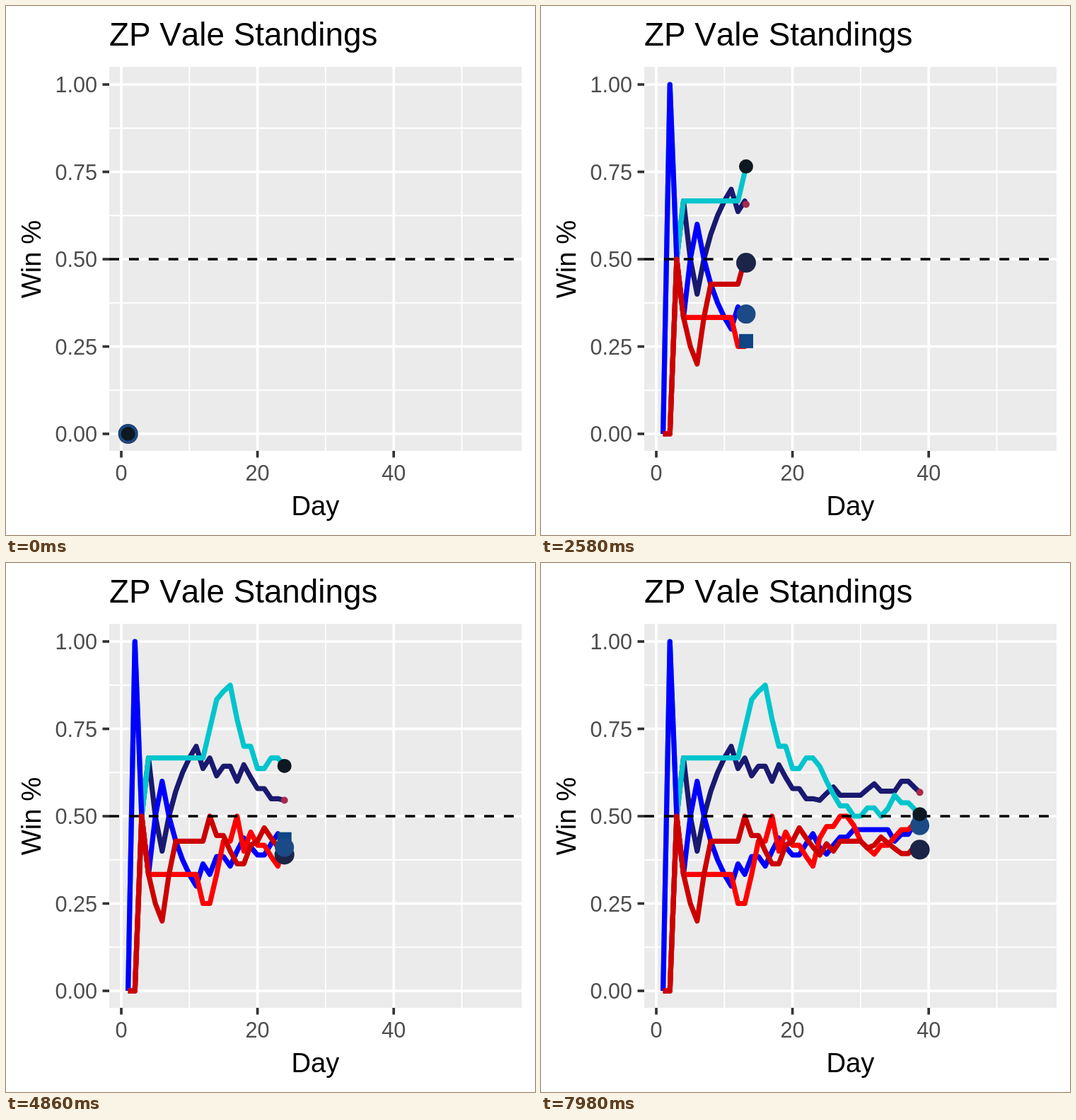
Recreate the animation shown at these times as an HTML page. Size 748 by 748 pixels, loop 8 s.

```html
<!DOCTYPE html>
<html lang="en">
<head>
<meta charset="utf-8">
<title>Standings</title>
<style>
  html, body { margin: 0; width: 100%; height: 100%; overflow: hidden; background: #fff; }
  svg { display: block; width: 100%; height: 100%; }
  text { font-family: "Liberation Sans", Arial, sans-serif; font-kerning: none; }
  .label { font-size: 30.6px; fill: #4d4d4d; }
  .axis { font-size: 38.2px; text-anchor: middle; }
  .title { font-size: 45.8px; }
</style>
</head>
<body>
<svg id="chart" viewBox="0 0 748 748">
  <rect x="146" y="86" width="583" height="543" fill="#ebebeb"/>
  <g id="grid"></g>
  <g id="lines" fill="none" stroke-width="7.2" stroke-linejoin="round"></g>
  <path d="M146 358H729" stroke="#000" stroke-width="3.6" stroke-dasharray="13.95"/>
  <g id="marks"></g>
  <text class="title" x="146" y="56">ZP Vale Standings</text>
  <text class="axis" x="437.5" y="720">Day</text>
  <text class="axis" transform="translate(49 358) rotate(-90)">Win %</text>
</svg>
<script>
const LOOP = 8000, STEP = 60, DAYS_PER_STEP = 0.2834;
const PANEL = { left: 146, right: 729, top: 86, bottom: 629 };
const xAt = day => 163 + day * 9.63;
const yAt = share => 605 - share * 494;

// Wins and losses added by one day's result, from day 2 on.
const RESULTS = { W: [1, 0], L: [0, 1], D: [1, 1], S: [2, 0], X: [0, 2], '-': [0, 0] };

// In drawing order of the lines; layer orders the markers.
const teams = [
  { color: '#191970', shape: 'circle', size: 10, fill: '#a82a4c', layer: 0,
    season: 'LWWLLWWWWWLWLW-LSLL-L-DWWL---WWL--S-LL' },
  { color: '#00c5cd', shape: 'circle', size: 20, fill: '#0d1820', layer: 4,
    season: 'WLW--------WSWWLL-L-W-DLLL-LDW-LWSL-LL' },
  { color: '#0000ff', shape: 'circle', size: 27, fill: '#1b4a86', layer: 3,
    season: 'WLLWWLLLLLWLW-LWWLL-WWXLWW-W-----XW-SL' },
  { color: '#ff0000', shape: 'square', size: 20, fill: '#0f4585', layer: 2,
    season: 'LWL-------L-DW-WXWL-LLSW-W-LXLLW-WW-WW' },
  { color: '#cd0000', shape: 'circle', size: 28, fill: '#1c2448', layer: 1,
    season: 'LWLLLWW----WL-LL-WDWLLLWLW---LDWLLL-WL' }
];

function add(parent, name, attrs, text) {
  const node = document.createElementNS('http://www.w3.org/2000/svg', name);
  for (const key in attrs) node.setAttribute(key, attrs[key]);
  if (text) node.textContent = text;
  return parent.appendChild(node);
}

function winShares(season) {
  let wins = 0, games = 0;
  return [0, ...[...season].map(result => {
    const [won, lost] = RESULTS[result];
    wins += won;
    games += won + lost;
    return games ? wins / games : 0;
  })];
}

const grid = document.getElementById('grid');
const stroke = (d, color, width) => add(grid, 'path', { d, stroke: color, 'stroke-width': width });
const vertical = (day, width) => stroke(`M${xAt(day)} ${PANEL.top}V${PANEL.bottom}`, '#fff', width);
const horizontal = (share, width) => stroke(`M${PANEL.left} ${yAt(share)}H${PANEL.right}`, '#fff', width);

[10, 30, 50].forEach(day => vertical(day, 1.85));
[0.125, 0.375, 0.625, 0.875].forEach(share => horizontal(share, 1.85));
[0, 20, 40].forEach(day => {
  vertical(day, 3.7);
  stroke(`M${xAt(day)} ${PANEL.bottom}v9.5`, '#333', 3.7);
  add(grid, 'text', { class: 'label', x: xAt(day), y: 671, 'text-anchor': 'middle' }, String(day));
});
[0, 0.25, 0.5, 0.75, 1].forEach(share => {
  horizontal(share, 3.7);
  stroke(`M${PANEL.left} ${yAt(share)}h-9.5`, '#333', 3.7);
  add(grid, 'text', { class: 'label', x: 129, y: yAt(share) + 11, 'text-anchor': 'end' }, share.toFixed(2));
});

const lines = document.getElementById('lines');
const marks = document.getElementById('marks');
for (const team of teams) {
  team.shares = winShares(team.season);
  team.line = add(lines, 'polyline', { stroke: team.color });
}
for (const team of [...teams].sort((a, b) => a.layer - b.layer)) {
  const { size, fill } = team;
  team.mark = team.shape === 'circle'
    ? add(marks, 'circle', { r: size / 2, fill })
    : add(marks, 'rect', { x: -size / 2, y: -size / 2, width: size, height: size, fill });
}

function draw(time) {
  const progress = Math.floor(time / STEP) * DAYS_PER_STEP;
  const passed = Math.floor(progress), part = progress - passed;
  const x = xAt(1 + progress);
  for (const { shares, line, mark } of teams) {
    const from = shares[passed];
    const to = shares[passed + 1] ?? from;
    const y = yAt(from + (to - from) * part);
    const points = shares.slice(0, passed + 1).map((share, i) => [xAt(i + 1), yAt(share)]);
    if (part) points.push([x, y]);
    line.setAttribute('points', points.join(' '));
    mark.setAttribute('transform', `translate(${x} ${y})`);
  }
}

const start = performance.now();
function tick(now) {
  draw(Math.max(0, now - start) % LOOP);
  requestAnimationFrame(tick);
}
draw(0);
requestAnimationFrame(tick);
</script>
</body>
</html>
```
